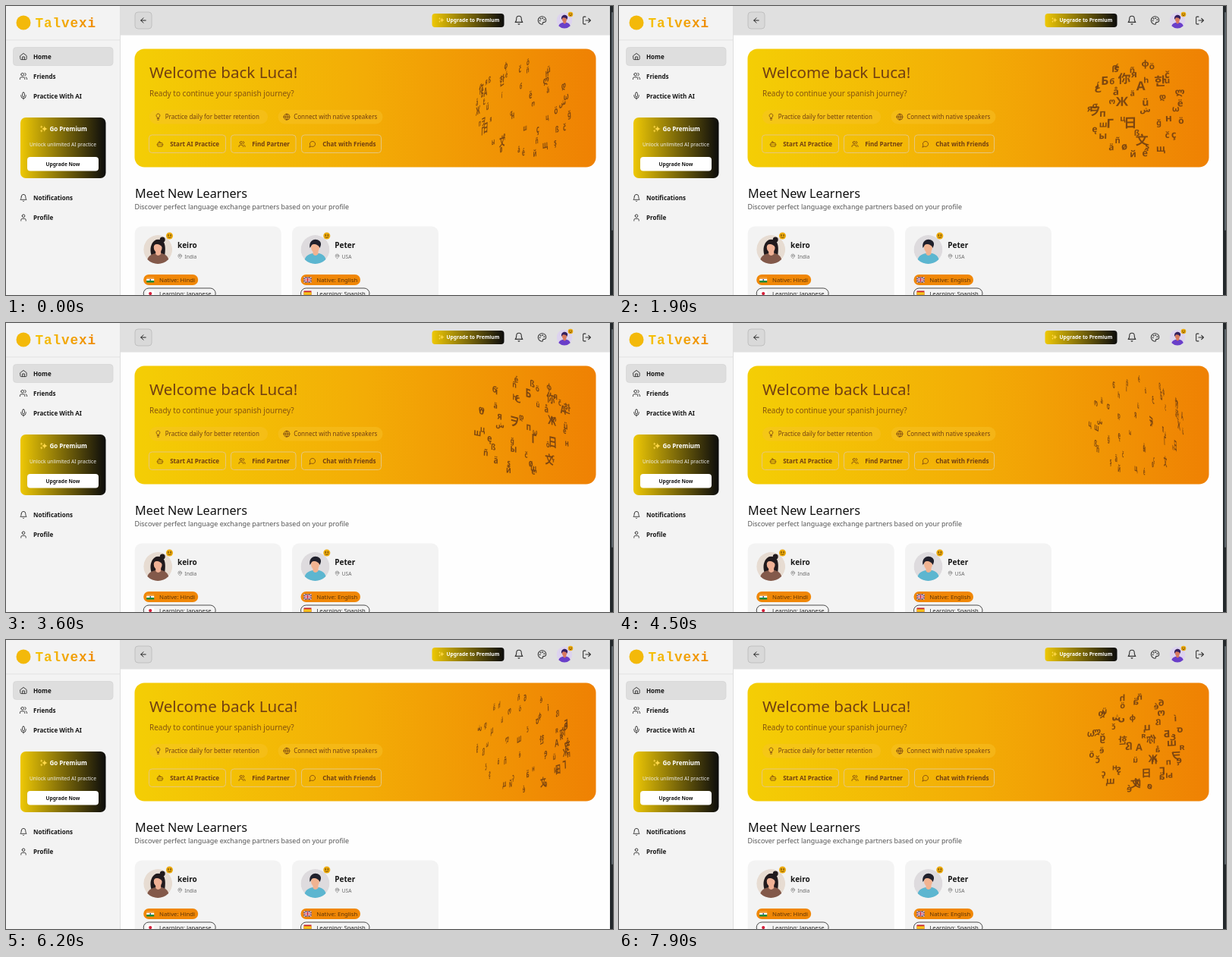
Animation, 800 px wide and 381 px high, one loop 8000 ms. Source, as an HTML page:

```html
<!DOCTYPE html>
<html lang="en">
<head>
<meta charset="utf-8">
<title>Language dashboard</title>
<style>
  html, body { margin: 0; width: 100%; height: 100%; overflow: hidden; background: #fefefe; }
  svg { display: block; width: 800px; height: 381px; font-family: "Noto Sans", "Open Sans", sans-serif; }
  #globe { font-family: "Noto Sans", "Noto Sans CJK SC", "Noto Sans CJK JP", "DejaVu Sans", sans-serif; font-weight: 700; }
</style>
</head>
<body>
<svg id="stage" viewBox="0 0 800 381">
  <defs>
    <linearGradient id="hero"><stop stop-color="#f4ce05"/><stop offset=".5" stop-color="#f3ac06"/><stop offset="1" stop-color="#ef8103"/></linearGradient>
    <linearGradient id="premium"><stop stop-color="#eec805"/><stop offset="1" stop-color="#0c0c0c"/></linearGradient>
    <linearGradient id="brand"><stop stop-color="#f5c408"/><stop offset="1" stop-color="#ef8a06"/></linearGradient>
    <clipPath id="disc"><circle r="19"/></clipPath>
  </defs>
  <g id="page"></g>
  <g id="globe" fill="#713f12" fill-opacity=".9" text-anchor="middle"></g>
</svg>
<script>
const NS = "http://www.w3.org/2000/svg";
const page = document.getElementById("page");
const globe = document.getElementById("globe");

function add(tag, attrs, parent = page, content = "") {
  const node = document.createElementNS(NS, tag);
  for (const key in attrs) node.setAttribute(key, attrs[key]);
  node.textContent = content;
  parent.appendChild(node);
  return node;
}
const box = (x, y, width, height, rx, fill, more = {}) =>
  add("rect", { x, y, width, height, rx, fill, ...more });
const label = (x, y, size, content, fill = "#161616", weight = 600, more = {}) =>
  add("text", { x, y, "font-size": size, fill, "font-weight": weight, ...more }, page, content);
const dot = (cx, cy, r, fill, parent = page) => add("circle", { cx, cy, r, fill }, parent);

const ring = (x, y, r) => `M${x - r} ${y}a${r} ${r} 0 1 0 ${2 * r} 0a${r} ${r} 0 1 0 ${-2 * r} 0`;
const ICONS = {
  home: "M3 10l9-7 9 7v9a2 2 0 0 1-2 2H5a2 2 0 0 1-2-2zM9 21v-8h6v8",
  users: "M16 21v-2a4 4 0 0 0-4-4H6a4 4 0 0 0-4 4v2M22 21v-2a4 4 0 0 0-3-3.9M16 3.1a4 4 0 0 1 0 7.8" + ring(9, 7, 4),
  mic: "M12 2a3 3 0 0 0-3 3v7a3 3 0 0 0 6 0V5a3 3 0 0 0-3-3M19 10v2a7 7 0 0 1-14 0v-2M12 19v3",
  bell: "M6 8a6 6 0 0 1 12 0c0 7 3 9 3 9H3s3-2 3-9M10.3 21a1.9 1.9 0 0 0 3.4 0",
  user: "M19 21v-2a4 4 0 0 0-4-4H9a4 4 0 0 0-4 4v2" + ring(12, 7, 4),
  arrow: "M12 19l-7-7 7-7M19 12H5",
  exit: "M9 21H5a2 2 0 0 1-2-2V5a2 2 0 0 1 2-2h4M16 17l5-5-5-5M21 12H9",
  palette: "M12 2a10 10 0 1 0 0 20c3 0 1-3 2-4.5s4-.5 6-1.5 2-3 2-4C22 6 17.5 2 12 2z"
    + ring(13.5, 6.5, .7) + ring(17.5, 10.5, .7) + ring(8.5, 7.5, .7) + ring(6.5, 12.5, .7),
  bulb: "M15 14c.2-1 .7-1.7 1.5-2.5A6 6 0 1 0 6 8c0 1 .2 2.2 1.5 3.5.7.7 1.3 1.5 1.5 2.5zM9 18h6M10 22h4",
  globe: ring(12, 12, 10) + "M2 12h20M12 2a15 15 0 0 1 0 20a15 15 0 0 1 0-20",
  bot: "M12 8V4H8M6 8h12a2 2 0 0 1 2 2v8a2 2 0 0 1-2 2H6a2 2 0 0 1-2-2v-8a2 2 0 0 1 2-2M2 14h2M20 14h2M15 13v2M9 13v2",
  chat: "M7.9 20A9 9 0 1 0 4 16.1L2 22z",
  pin: "M20 10c0 6-8 12-8 12s-8-6-8-12a8 8 0 0 1 16 0z" + ring(12, 10, 3)
};
function icon(name, cx, cy, size = 11, stroke = "#333") {
  add("path", {
    d: ICONS[name], fill: "none", stroke, "stroke-width": 2, "stroke-linecap": "round", "stroke-linejoin": "round",
    transform: `translate(${cx - size / 2} ${cy - size / 2}) scale(${size / 24})`
  });
}
function sparkle(x, y, size) {
  const star = "M0-5Q.5-.5 5 0Q.5.5 0 5Q-.5.5-5 0Q-.5-.5 0-5";
  for (const [dx, dy, k] of [[.1, 0, .1], [-.4, .35, .05], [-.4, -.35, .05]])
    add("path", { d: star, fill: "#ffd84a", transform: `translate(${x + dx * size} ${y + dy * size}) scale(${k * size})` });
}
function badge(x, y, r) {
  dot(x, y, r, "#eba90c");
  dot(x - r * .35, y - r * .2, r * .2, "#5b3b08");
  dot(x + r * .35, y - r * .2, r * .2, "#5b3b08");
  add("path", { d: `M${x - r * .5} ${y + r * .25}q${r * .5} ${r * .6} ${r} 0`, fill: "none", stroke: "#5b3b08", "stroke-width": .8 });
}
function avatar(x, y, scale, look) {
  const outer = add("g", { transform: `translate(${x} ${y}) scale(${scale})` });
  const g = add("g", { "clip-path": "url(#disc)" }, outer);
  const shape = (d, fill) => add("path", { d, fill }, g);
  dot(0, 0, 19, look.back, g);
  if (look.longHair) {
    shape("M-8 9C-12 0-9-13 1-13S10-1 9 8z", look.hair);
    dot(6, -13, 3.5, look.hair, g);
  }
  shape("M-15 20C-15 9-9 6-3 5L5 5C12 7 15 11 15 20z", look.shirt);
  shape("M-3 1H4V6Q0 10-3 6z", look.skin);
  add("ellipse", { cx: 0, cy: -3, rx: 5.5, ry: 7, fill: look.skin }, g);
  shape("M-7-2C-9-12 0-16 6-11C9-8 7-4 6-2C5-5 2-7-2-7C-5-7-5-4-7-2z", look.hair);
}
function flag(kind, x, y) {
  const band = (dy, h, fill) => box(x, y + dy, 10, h, 0, fill);
  if (kind === "india") { band(0, 2.4, "#f39a32"); band(2.3, 2.4, "#fff"); band(4.6, 2.4, "#168a3a"); dot(x + 5, y + 3.5, .9, "#28428c"); }
  if (kind === "japan") { band(0, 7, "#fff"); dot(x + 5, y + 3.5, 2.1, "#d5203b"); }
  if (kind === "spain") { band(0, 7, "#c8202c"); band(1.8, 3.5, "#f6c51c"); }
  if (kind === "uk") {
    band(0, 7, "#24407e");
    const cross = (d, stroke, w) => add("path", { d, stroke, "stroke-width": w });
    const diagonal = `M${x} ${y}l10 7M${x + 10} ${y}l-10 7`;
    const upright = `M${x + 5} ${y}v7M${x} ${y + 3.5}h10`;
    cross(diagonal, "#fff", 1.4);
    cross(diagonal, "#cc2637", .5);
    cross(upright, "#fff", 2.2);
    cross(upright, "#cc2637", 1.2);
  }
}

function drawSidebar() {
  box(0, 0, 151, 381, 0, "#f3f3f3");
  box(150, 0, 1, 381, 0, "#dedede");
  box(0, 44.5, 150, .8, 0, "#dedede");
  dot(23, 22, 9.5, "#f3b90a");
  label(38.5, 27.5, 17.7, "Talvexi", "url(#brand)", 700,
    { "font-family": '"Liberation Mono", monospace', "letter-spacing": ".05em" });
  box(9.5, 54.5, 131.5, 24, 4, "#dedede", { stroke: "#d4d4d4", "stroke-width": .7 });
  [["home", "Home", 66.5], ["users", "Friends", 92.5], ["mic", "Practice With AI", 118.5],
   ["bell", "Notifications", 253], ["user", "Profile", 279]].forEach(([name, content, y]) => {
    icon(name, 23, y);
    label(36, y + 3, 8, content);
  });
  box(19, 147, 112.5, 80, 7, "url(#premium)");
  sparkle(50, 162, 8);
  label(57.5, 165, 8, "Go Premium", "#fff");
  label(75, 185, 6.7, "Unlock unlimited AI practice", "#eee", 400, { "text-anchor": "middle" });
  box(28, 199, 94, 18.5, 4, "#fff");
  label(75, 210.5, 6.6, "Upgrade Now", "#161616", 600, { "text-anchor": "middle" });
}

function drawTopBar() {
  box(151, 0, 646, 38.5, 0, "#e0e0e0");
  box(170, 8, 22, 22, 4, "#d9d9d9", { stroke: "#b9b9b9", "stroke-width": .8 });
  icon("arrow", 181, 19, 11, "#111");
  box(561.5, 10, 95, 18, 4, "url(#premium)");
  sparkle(574, 18.5, 6);
  label(580.5, 21.4, 6.7, "Upgrade to Premium", "#fff");
  icon("bell", 676, 18.7, 13);
  icon("palette", 706.5, 19, 12.5);
  avatar(736, 19, .55, { back: "#ddd3ef", shirt: "#6a3fc9", skin: "#d9795f", hair: "#352060" });
  badge(744, 11, 3.3);
  icon("exit", 765.5, 19, 13);
}

function drawHero() {
  const brown = "#713f12";
  box(169.5, 56.5, 608, 156, 13, "url(#hero)");
  label(189, 95, 20.6, "Welcome back Luca!", brown, 500);
  label(189, 118.5, 10, "Ready to continue your spanish journey?", "#85540f", 400);
  [["bulb", "Practice daily for better retention", 189, 156], ["globe", "Connect with native speakers", 358.5, 138]]
    .forEach(([name, content, x, w]) => {
      box(x, 137, w, 18.5, 9, "#f6c22b", { "fill-opacity": .45 });
      icon(name, x + 11.5, 146.2, 9.5, brown);
      label(x + 20.7, 149.4, 8, content, brown, 500);
    });
  [["bot", "Start AI Practice", 188.5, 101], ["users", "Find Partner", 296.5, 85.5], ["chat", "Chat with Friends", 389.5, 105]]
    .forEach(([name, content, x, w]) => {
      box(x, 170, w, 23.5, 4, "none", { stroke: "#e6c67c" });
      icon(name, x + 14.5, 182, 9.5, brown);
      label(x + 27.7, 185, 8, content, brown);
    });
}

function drawLearner(x, person) {
  box(x, 290.5, 193, 110, 9, "#f3f3f3");
  avatar(x + 30.5, 321, 1, person.look);
  badge(x + 45.8, 303, 4.5);
  label(x + 56.3, 319, 10, person.name);
  icon("pin", x + 59.5, 330, 7, "#666");
  label(x + 65.8, 332.6, 6.6, person.country, "#666", 400);
  box(x + 11.5, 354, person.nativeWidth, 14, 7, "#f08706");
  flag(person.flags[0], x + 15.5, 357.5);
  label(x + 32.3, 363.8, 7.8, "Native: " + person.native, "#5e3408", 400);
  box(x + 11.5, 372, person.learningWidth, 14, 7, "#f3f3f3", { stroke: "#222", "stroke-width": .8 });
  flag(person.flags[1], x + 15.5, 375.5);
  label(x + 32.3, 381.8, 7.7, "Learning: " + person.learning, "#222", 400);
}

function drawLearners() {
  label(170, 252.7, 16.2, "Meet New Learners", "#111", 500);
  label(169.5, 267.6, 8.95, "Discover perfect language exchange partners based on your profile", "#555", 400);
  drawLearner(169.7, {
    name: "keiro", country: "India", native: "Hindi", learning: "Japanese", flags: ["india", "japan"],
    nativeWidth: 72, learningWidth: 95,
    look: { back: "#e7dcd2", shirt: "#83594a", skin: "#f0b195", hair: "#211a1d", longHair: true }
  });
  drawLearner(377, {
    name: "Peter", country: "USA", native: "English", learning: "Spanish", flags: ["uk", "spain"],
    nativeWidth: 78.5, learningWidth: 90.5,
    look: { back: "#dedbde", shirt: "#5cb6d0", skin: "#f1b391", hair: "#20202c" }
  });
  box(796, 0, 4, 381, 0, "#23282b");
  box(798, 8, 2, 288, 1, "#5b646a");
}

// Globe: parallel glyph planes on a tilted sphere, seen in perspective.
const RADIUS = 61, DISTANCE = 420, TILT = .28, CENTER = [682, 135];
const SPIN = .5, FACING = -1.05;
const LARGE = [["文", -.775, .8], ["日", -1.085, .52], ["Г", -1.57, .5], ["ヲ", -1.97, .2], ["Ж", -1.225, .14],
               ["А", -.87, -.16], ["你", -1.2, -.33], ["한", -.45, -.31], ["Б", -1.7, -.38]];
const SMALL = "éйøщäюşыçñфčęнßпöшüğяёцåωσξشعლოяდíčäßüбфhéöñ";

function spherePoint(lon, y) {
  const r = Math.sqrt(1 - y * y);
  return [r * Math.sin(lon) * RADIUS, y * RADIUS, r * Math.cos(lon) * RADIUS];
}
function project([x, y, z], turn) {
  const c = Math.cos(turn), s = Math.sin(turn);
  const x1 = x * c + z * s, z1 = z * c - x * s;
  const y2 = y * Math.cos(TILT) - z1 * Math.sin(TILT);
  const z2 = z1 * Math.cos(TILT) + y * Math.sin(TILT);
  const k = DISTANCE / (DISTANCE - z2);
  return [CENTER[0] + x1 * k, CENTER[1] + y2 * k];
}
const glyphs = [];
function addGlyph(char, lon, y, size) {
  // Longitudes are given at time zero; store them in the planes' own frame.
  const node = add("text", { "font-size": size, y: size * .36 }, globe, char);
  glyphs.push({ node, point: spherePoint(lon - FACING, y) });
}
LARGE.forEach(([char, lon, y]) => addGlyph(char, lon, y, 15));
const anchors = glyphs.map(g => g.point);
[...SMALL].forEach((char, i, all) => {
  const y = 1 - 2 * (i + .5) / all.length, lon = i * 2.39996;
  const p = spherePoint(lon - FACING, y);
  if (anchors.every(q => Math.hypot(p[0] - q[0], p[1] - q[1], p[2] - q[2]) > 13)) addGlyph(char, lon, y, 12);
});

function update(time) {
  const turn = FACING + SPIN * time / 1000;
  for (const { node, point: [x, y, z] } of glyphs) {
    const o = project([x, y, z], turn);
    const u = project([x + 1, y, z], turn);
    const v = project([x, y + 1, z], turn);
    const m = [u[0] - o[0], u[1] - o[1], v[0] - o[0], v[1] - o[1], o[0], o[1]];
    node.setAttribute("transform", `matrix(${m.map(n => n.toFixed(4)).join(" ")})`);
  }
}

drawSidebar();
drawTopBar();
drawHero();
drawLearners();

const LOOP = 8000, STEP = 100;
const start = performance.now();
function tick() {
  const elapsed = (performance.now() - start) % LOOP;
  update(Math.floor(elapsed / STEP) * STEP);
  requestAnimationFrame(tick);
}
tick();
</script>
</body>
</html>
```
